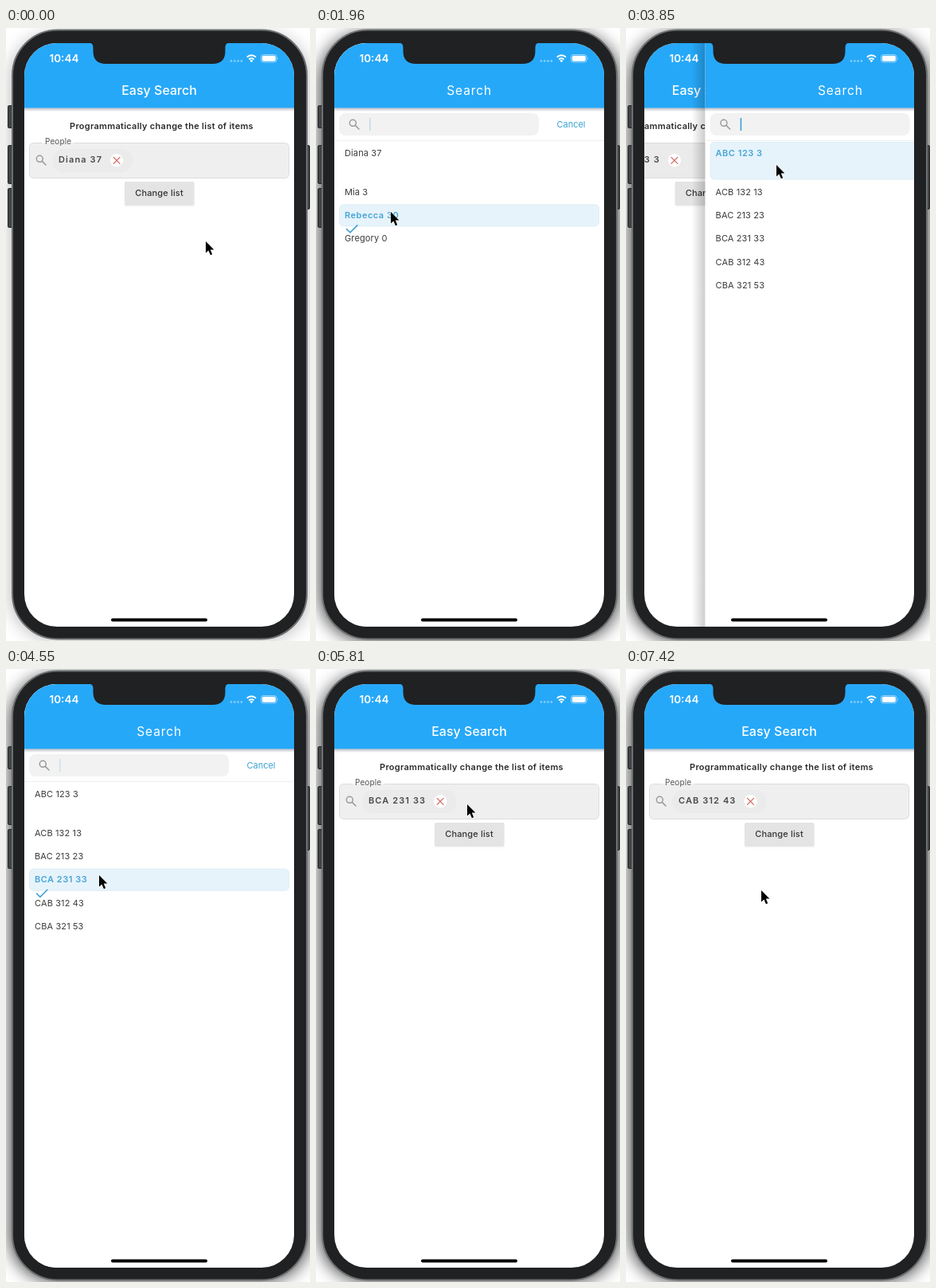
Animation, 382 px wide and 770 px high, one loop 7490 ms. Source, as an HTML page:

```html
<!DOCTYPE html>
<html lang="en">
<head>
<meta charset="utf-8">
<title>Easy Search</title>
<style>
  html, body { margin: 0; width: 100%; height: 100%; overflow: hidden; background: #fff; }
  svg { display: block; width: 382px; height: 770px; }
  text { font-family: Inter, Roboto, sans-serif; font-size: 11px; fill: #333; white-space: pre; }
  .mid { text-anchor: middle; }
  .title { font-size: 16px; font-weight: 500; fill: #fff; }
  .spaced { font-size: 15.5px; letter-spacing: .9px; }
  .clock { font-size: 13.5px; font-weight: 600; fill: #fff; }
  .head { font-weight: 600; letter-spacing: .27px; fill: #2b2b2b; }
  .label { font-size: 10px; letter-spacing: .1px; fill: #555; }
  .chip { font-weight: 600; letter-spacing: 1.1px; fill: #484848; }
  .button { font-weight: 500; letter-spacing: .15px; }
  .link { fill: #3ba3d3; }
  .row { letter-spacing: .12px; fill: #3c3c3c; }
  .picked { font-weight: 600; letter-spacing: .5px; fill: #48a5d6; }
  .line { fill: none; stroke-linecap: round; }
</style>
</head>
<body>
<svg viewBox="0 0 382 770">
  <defs>
    <clipPath id="screen"><rect x="23" y="19" width="339" height="733" rx="41"/></clipPath>
    <filter id="blur" x="-20%" y="-20%" width="140%" height="140%"><feGaussianBlur stdDeviation="11"/></filter>
    <filter id="soft" x="-20%" y="-40%" width="140%" height="180%"><feGaussianBlur stdDeviation="1.3"/></filter>
    <linearGradient id="edge"><stop offset="0" stop-opacity="0"/><stop offset="1" stop-opacity=".2"/></linearGradient>
    <linearGradient id="drop" x2="0" y2="1"><stop offset="0" stop-color="#556" stop-opacity=".38"/><stop offset="1" stop-color="#556" stop-opacity="0"/></linearGradient>
    <g id="bar">
      <rect x="23" y="19" width="339" height="733" fill="#fff"/>
      <rect x="23" y="19" width="339" height="81.5" fill="#26a8f8"/>
      <rect x="23" y="100.5" width="339" height="4.5" fill="url(#drop)"/>
    </g>
    <g id="lens" class="line" stroke="#9a9a9a" stroke-width="1.5">
      <circle cx="-1.7" cy="-1.7" r="4"/><path d="M1.4 1.4 6 6"/>
    </g>
  </defs>

  <rect width="382" height="770" fill="#fff"/>
  <rect id="halo" x="6" y="8" width="374" height="760" rx="56" filter="url(#blur)"/>
  <g fill="#414345" stroke="#26282a">
    <rect x="2.5" y="97.5" width="8" height="28" rx="1.5"/>
    <rect x="2.5" y="147.5" width="8" height="48" rx="1.5"/>
    <rect x="2.5" y="201.5" width="8" height="49" rx="1.5"/>
    <rect x="374.5" y="147.5" width="7" height="80" rx="1.5"/>
  </g>
  <rect x="8" y="2.5" width="370" height="765" rx="57" fill="#202122" stroke="#6d7072" stroke-width="2"/>

  <g clip-path="url(#screen)">
    <g id="home">
      <use href="#bar"/>
      <text class="title mid" x="192.5" y="84">Easy Search</text>
      <text class="head mid" x="195.5" y="126.8">Programmatically change the list of items</text>
      <rect id="field" x="29.5" y="144.5" width="326" height="44" rx="5" fill="#efefef" stroke="#dcdcdc"/>
      <rect x="45" y="136" width="41" height="8.5" fill="#fff"/>
      <rect x="45" y="144" width="41" height="1.5" fill="#efefef"/>
      <text class="label" x="49" y="145.7">People</text>
      <use href="#lens" x="44" y="166"/>
      <rect id="pill" x="58" y="152" height="29" rx="14" fill="#ebebeb"/>
      <text id="value" class="chip" x="66" y="168.8"></text>
      <g id="clear">
        <circle r="8.2" fill="#fff"/>
        <path class="line" d="M-4-4 4 4M4-4-4 4" stroke="#cf675e" stroke-width="1.2"/>
      </g>
      <rect id="lift" x="149" y="194.5" width="88" height="30" rx="2" fill="#000" filter="url(#soft)"/>
      <rect id="button" x="149" y="193" width="87.5" height="30" rx="2"/>
      <text class="button mid" x="192.5" y="211.3">Change list</text>
    </g>
    <g id="search">
      <rect x="6" y="19" width="17" height="733" fill="url(#edge)"/>
      <use href="#bar"/>
      <text class="title spaced mid" x="192.7" y="84" style="font-weight:400">Search</text>
      <rect x="29" y="107" width="251" height="28" rx="8" fill="#f2f2f2"/>
      <use href="#lens" x="48" y="121"/>
      <rect id="caret" x="67" y="113" width="1.6" height="16" fill="#3b9fd6"/>
      <text class="link mid" x="320.5" y="124.5">Cancel</text>
      <rect x="23" y="141" width="339" height="1" fill="#efefef"/>
      <g id="list"></g>
    </g>
    <g fill="#fff">
      <text class="clock" x="54.5" y="42.8">10:44</text>
      <g opacity=".4">
        <circle cx="283" cy="41.5" r="1.4"/><circle cx="287.3" cy="41.5" r="1.4"/>
        <circle cx="291.6" cy="41.5" r="1.4"/><circle cx="295.9" cy="41.5" r="1.4"/>
      </g>
      <g class="line" stroke="#fff" stroke-width="2">
        <path d="M302.8 36.6a8 8 0 0 1 11.2 0M305.3 39.4a4.6 4.6 0 0 1 6.2 0" stroke-linecap="butt"/>
      </g>
      <path d="M306.4 41.1a2.8 2.8 0 0 1 4 0l-2 2.2z"/>
      <rect x="320.5" y="33.5" width="19.5" height="9.5" rx="2.8" fill="none" stroke="#fff" stroke-opacity=".5"/>
      <rect x="321.8" y="34.8" width="17" height="7" rx="1.7"/>
      <path d="M341 36.7q1.6 1.5 0 3z" opacity=".6"/>
    </g>
    <rect x="132" y="741.5" width="121" height="4" rx="2"/>
  </g>
  <path d="M104 18.5q5.5 0 5.5 6v4.5q0 16 16 16h134q16 0 16-16v-4.5q0-6 5.5-6z" fill="#202122"/>
  <path id="cursor" d="M0 0V14.6L3.4 11.5 5.9 17.2 8.2 16.2 5.8 10.6H10.4Z" stroke="#fff" stroke-width="1.1" paint-order="stroke"/>
</svg>

<script>
const LOOP = 7490, TICK = 70, SLIDE = 400;
const $ = id => document.getElementById(id);

const people = ['Diana 37', 'Mia 3', 'Rebecca 30', 'Gregory 0'];
const codes = ['ABC 123 3', 'ACB 132 13', 'BAC 213 23', 'BCA 231 33', 'CAB 312 43', 'CBA 321 53'];

// Each visit to the search page: opens, picks an item, closes.
const visits = [
  { push: 230, pick: 1890, pop: 2050, items: people, from: 0, to: 2 },
  { push: 3716, pick: 4540, pop: 4685, items: codes, from: 0, to: 3 },
  { push: 5900, pick: 6670, pop: 6790, items: codes, from: 3, to: 4 }
];

const chipValues = [
  [0, people[0]], [visits[0].pop, people[2]], [2940, codes[0]],
  [visits[1].pop, codes[3]], [visits[2].pop, codes[4]]
];

// time, x, y of the pointer tip
const pointer = [
  [0, 251, 268], [70, 251, 268], [230, 200, 170], [1050, 200, 170],
  [1680, 94, 231], [2520, 94, 231], [2800, 196, 201], [3290, 196, 201],
  [3500, 189, 172], [4110, 189, 172], [4480, 117, 259], [5080, 117, 259],
  [5600, 190, 170], [6240, 190, 170], [6560, 102, 304], [7140, 102, 304],
  [7420, 170, 278], [LOOP, 170, 278]
];

const clamp = v => Math.min(1, Math.max(0, v));
const mix = (a, b, k) => a + (b - a) * k;
const smooth = k => k * k * (3 - 2 * k);
const ramp = (t, start, length) => clamp((t - start) / length);
const bezier = (a, b, s) => 3 * a * s * (1 - s) ** 2 + 3 * b * s * s * (1 - s) + s ** 3;

function slideEase(k) {
  if (k <= 0 || k >= 1) return clamp(k);
  let low = 0, high = 1;
  for (let i = 0; i < 24; i++) {
    const s = (low + high) / 2;
    if (bezier(.35, .33, s) < k) low = s; else high = s;
  }
  return bezier(.91, .97, low);
}

function drawList(visit, t) {
  const done = t >= visit.pick;
  const grow = smooth(ramp(t, visit.pick + TICK, 200));
  const selected = done ? visit.to : visit.from;
  let y = 142, html = '';
  visit.items.forEach((name, i) => {
    const open = i === visit.to ? grow : i === visit.from ? 1 - grow : 0;
    const height = 29.4 + 19.6 * open;
    const on = i === selected;
    if (on) {
      const x = done ? mix(45, 340, grow) : 340;
      html += `<rect x="29.5" y="${y + 1.5}" width="326" height="${height - 2.4}" rx="5" fill="#e6f3fb" stroke="#d9ebf5" stroke-width=".8"/>
        <path class="line" d="M${x - 6.5} ${y + 32.2}l4.4 4.3 9-9" stroke="#439fd3" stroke-width="1.6"/>`;
    }
    html += `<text class="${on ? 'picked' : 'row'}" x="36" y="${y + 18.5}">${name}</text>`;
    y += height;
  });
  $('list').innerHTML = html;
}

function drawChip(t) {
  const name = chipValues.filter(([start]) => start <= t).pop()[1];
  const value = $('value');
  if (value.textContent !== name) value.textContent = name;
  const end = 65 + value.getComputedTextLength();
  $('pill').setAttribute('width', end + 39 - 58);
  $('clear').setAttribute('transform', `translate(${end + 19} 166.3)`);
}

function drawPointer(t) {
  const next = pointer.findIndex(([time]) => time > t);
  const [t0, x0, y0] = pointer[next - 1], [t1, x1, y1] = pointer[next];
  const k = smooth(ramp(t, t0, t1 - t0));
  $('cursor').setAttribute('transform', `translate(${mix(x0, x1, k)} ${mix(y0, y1, k)})`);
}

function render(t) {
  const visit = visits.filter(v => v.push <= t).pop() || visits[0];
  const shown = slideEase(ramp(t, visit.push, SLIDE)) - slideEase(ramp(t, visit.pop, SLIDE));
  $('home').setAttribute('transform', `translate(${-113 * shown} 0)`);
  $('search').setAttribute('transform', `translate(${339 * (1 - shown)} 0)`);
  $('search').setAttribute('visibility', shown > 0 ? 'visible' : 'hidden');
  drawList(visit, t);

  const blink = Math.max(0, t - visit.push) % 1000;
  $('caret').setAttribute('opacity', mix(1, .2, ramp(blink, 500, 250)));

  const press = ramp(t, 2800, 140) - ramp(t, 3080, 140);
  $('button').setAttribute('fill', `rgb(${Array(3).fill(Math.round(mix(228, 215, press)))})`);
  $('lift').setAttribute('opacity', mix(.04, .35, press));
  $('field').setAttribute('fill', shown > 0 && t < visit.pop ? '#eaeaea' : '#efefef');
  $('halo').setAttribute('opacity', mix(.28, .8, ramp(t, 70, 210)));

  drawChip(t);
  drawPointer(t);
}

const begin = performance.now();
let last = -1;
function frame() {
  const elapsed = (performance.now() - begin) % LOOP;
  const t = Math.floor(elapsed / TICK) * TICK;
  if (t !== last) render(last = t);
  requestAnimationFrame(frame);
}
frame();
</script>
</body>
</html>
```
